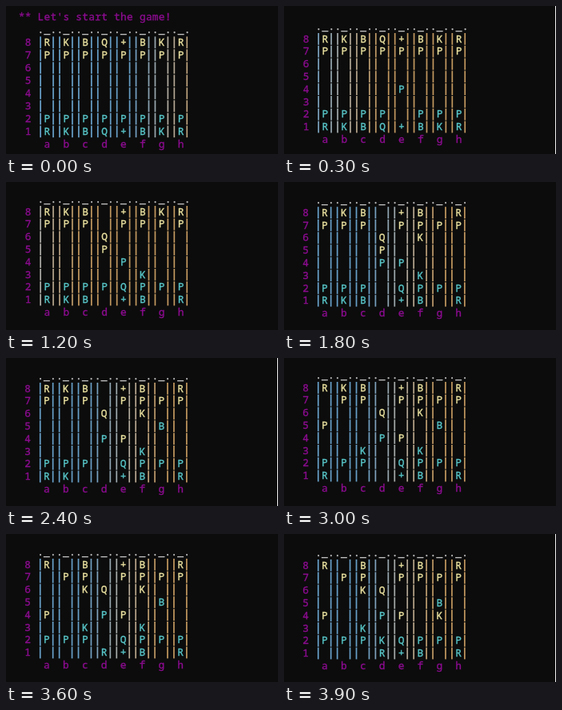
An HTML page with a canvas for the animation above (4200 ms loop, 340 px wide and 186 px high).

```html
<!DOCTYPE html>
<html lang="en">
<head>
<meta charset="utf-8">
<title>Console chess</title>
<style>
  html, body { margin: 0; width: 100%; height: 100%; overflow: hidden; background: #0c0c0c; }
  canvas { display: block; width: 340px; height: 186px; }
</style>
</head>
<body>
<canvas id="stage" width="340" height="186"></canvas>
<script>
const ctx = document.getElementById('stage').getContext('2d');
const STEP = 300, CELL = 7.96;
const FILES = 'abcdefgh', BACK = 'RKBQ+BKR';
const MAGENTA = '#8c0c90', YELLOW = '#ebe2a0', CYAN = '#58c6c8', GREY = '#cccccc';

// Per step: moves played, view offset, where bars turn from blue to orange,
// and whether the window's light right edge is in view.
const steps = [
  { moves: '', x: 0, y: 45.4, tint: 200 },
  { moves: 'e2e4', x: 0, y: 41, tint: 75, edge: true },
  { moves: 'd7d5 d1e2', x: 0.4, y: 41, tint: 75 },
  { moves: 'd8d6', x: 0, y: 37, tint: 45 },
  { moves: 'g1f3', x: 0, y: 37, tint: 45 },
  { moves: 'g8f6', x: -0.4, y: 38, tint: 150 },
  { moves: 'd2d4', x: -0.4, y: 38.2, tint: 150 },
  { moves: 'd5e4', x: -0.4, y: 39, tint: 150 },
  { moves: 'c1g5', x: -0.4, y: 38, tint: 150, edge: true },
  { moves: 'a7a5', x: -0.4, y: 38, tint: 145 },
  { moves: 'b1c3', x: -0.4, y: 37, tint: 145 },
  { moves: 'a5a4', x: -0.4, y: 37, tint: 145, edge: true },
  { moves: 'a1d1 b8c6', x: -0.4, y: 38, tint: 145 },
  { moves: 'f3d2 f6g4', x: -0.4, y: 39, tint: 145, edge: true }
];

function startBoard() {
  const board = {};
  [...FILES].forEach((file, i) => {
    board[file + 8] = { glyph: BACK[i], color: YELLOW };
    board[file + 7] = { glyph: 'P', color: YELLOW };
    board[file + 2] = { glyph: 'P', color: CYAN };
    board[file + 1] = { glyph: BACK[i], color: CYAN };
  });
  return board;
}

function play(board, moves) {
  const next = { ...board };
  for (const move of moves.split(' ').filter(Boolean)) {
    const from = move.slice(0, 2);
    next[move.slice(2)] = next[from];
    delete next[from];
  }
  return next;
}

let position = startBoard();
for (const step of steps) step.board = position = play(position, step.moves);

// Writes text on the console grid; a hairline stroke gives the console weight.
function write(text, col, y, color) {
  ctx.fillStyle = ctx.strokeStyle = color;
  [...text].forEach((ch, i) => {
    const x = (col + i) * CELL + 3.6;
    ctx.fillText(ch, x, y + 4.5);
    ctx.strokeText(ch, x, y + 4.5);
  });
}

function barTint(center) {
  const g = ctx.createLinearGradient(center - 45, 0, center + 45, 0);
  g.addColorStop(0, '#679fc8');
  g.addColorStop(0.5, '#aeaaa2');
  g.addColorStop(1, '#c2985f');
  return g;
}

function bar(col, y, tint) {
  ctx.fillStyle = tint;
  ctx.fillRect(col * CELL + 2.5, y - 7, 1.7, 14.8);
}

function draw(step, opening) {
  const line = opening ? 16 : 15.8;
  ctx.setTransform(1, 0, 0, 1, 0, 0);
  ctx.fillStyle = '#0c0c0c';
  ctx.fillRect(0, 0, 340, 186);
  if (step.edge) {
    ctx.fillStyle = '#f0f0f0';
    ctx.fillRect(339, 0, 1, 186);
  }
  ctx.font = '12.8px "Noto Sans Mono", "DejaVu Sans Mono", monospace';
  ctx.textAlign = 'center';
  ctx.lineWidth = 0.35;
  ctx.translate(step.x, step.y);

  if (opening) write("** Let's start the game!", 2, -2 * line, MAGENTA);
  write('._.'.repeat(8), 5, -line, GREY);

  const tint = barTint(step.tint);
  for (let rank = 8; rank > 0; rank--) {
    const y = (8 - rank) * line;
    write(String(rank), 3, y, MAGENTA);
    [...FILES].forEach((file, i) => {
      const col = 5 + 3 * i, piece = step.board[file + rank];
      bar(col, y, tint);
      bar(col + 2, y, tint);
      if (piece) write(piece.glyph, col + 1, y, piece.color);
    });
  }
  [...FILES].forEach((file, i) => write(file, 6 + 3 * i, 8 * line, MAGENTA));
}

const begin = performance.now();
function tick() {
  const index = Math.floor((performance.now() - begin) / STEP) % steps.length;
  draw(steps[index], index === 0);
  requestAnimationFrame(tick);
}
tick();
</script>
</body>
</html>
```
